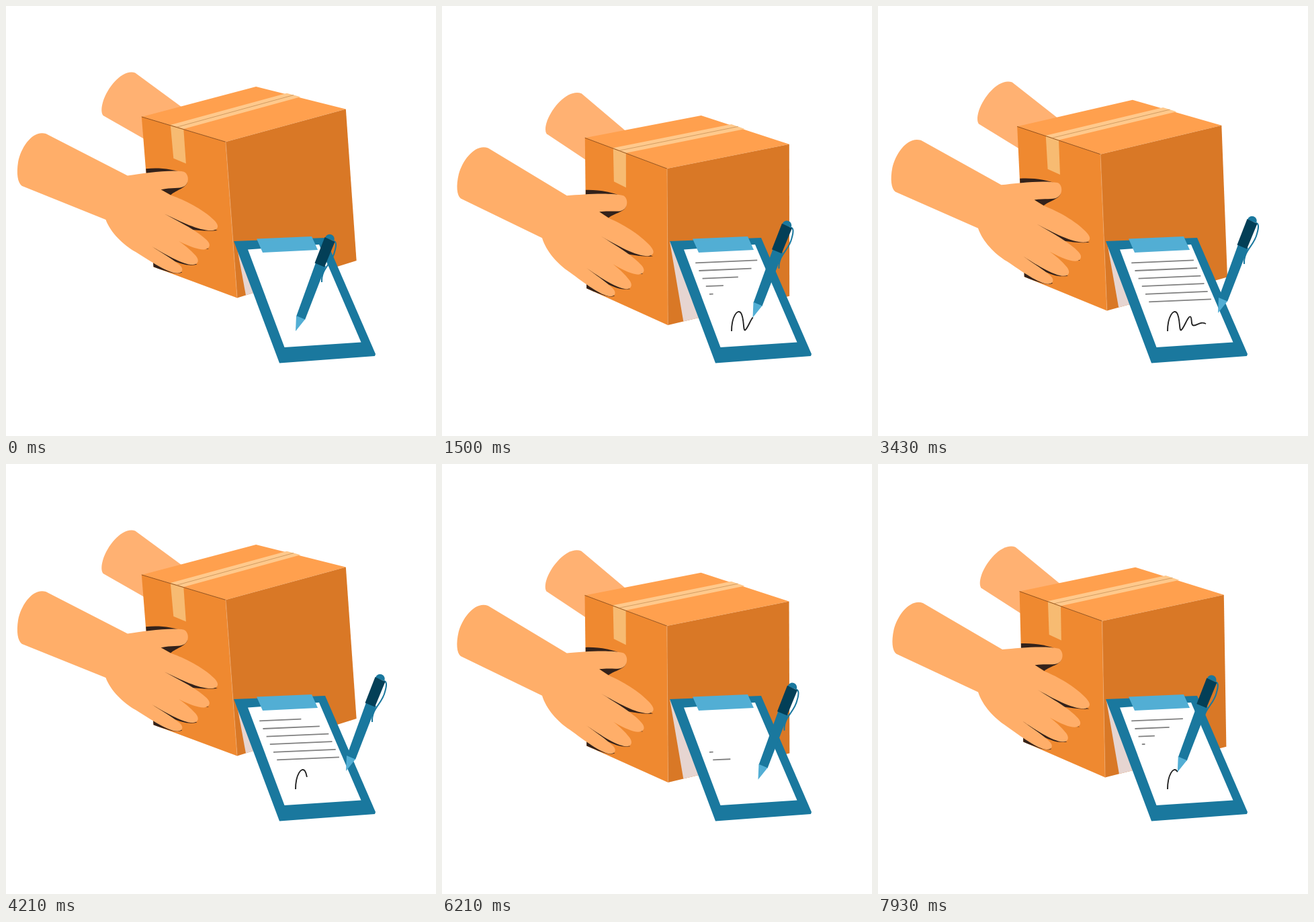
These frames come from a looping animation (640x640 px, 8 s). An HTML page with a canvas:

```html
<!DOCTYPE html>
<html lang="en">
<head>
<meta charset="utf-8">
<title>Parcel delivery</title>
<style>
  html, body { margin: 0; height: 100%; overflow: hidden; background: #fff; }
  canvas { display: block; width: 100vw; height: 100vh; }
</style>
</head>
<body>
<canvas width="640" height="640"></canvas>
<script>
const ctx = document.querySelector('canvas').getContext('2d');
const LOOP = 8000, FPS = 14;
const BLUE = '#1a789e', LIGHT_BLUE = '#52aed4', NAVY = '#033f57', DARK = '#33221b';

const shape = (d, color) => ({ path: new Path2D(d), color });
const rightFace = new Path2D('M335 243 517 207 517 433 336 476Z');

// Parcel and arms in their lowered pose
const parcel = [
  shape('M274 187 208 131C190 124 166 148 157 171C153 182 154 188 156 191L216 231Z', '#ffb172'),
  shape('M213 197 335 243 336 476 215 421Z', '#ef8930'),
  shape('M213 197 386 164 517 207 335 243Z', '#ffa04e'),
  { path: rightFace, color: '#d97826' },
  shape('M255 212 431 177 451 184 274 219.5Z', '#ffc98c'),
  shape('M255 212 274 219.5 274 271 256 262Z', '#f7bb72')
];
const seams = [
  ['M213 197 335 243', '#8a4a17', 0.9],
  ['M264 216 441 180.5', '#c08a50', 0.7],
  ['M335.3 243 336 476', '#f0b07a', 0.6]
].map(([d, color, width]) => ({ path: new Path2D(d), color, width }));
const hands = [
  shape('M214 274.5C235 274 254 278 270 285L214 290Z', DARK),
  shape('M234 307 274 298C273 307 257 309 248 316Z', DARK),
  shape('M236 343 285 362 314 373.5C300 374 288 372 276 370Z', DARK),
  shape('M220 362 270 383 299 400C286 400 276 394 268 390Z', DARK),
  shape('M214 390 250 406 280 422C266 424 256 419 247 415Z', DARK),
  shape('M215 413 257 432C250 435 242 433 215 421Z', DARK),
  shape(`M69 212C50 205 31 229 25 251C21 268 22 282 28 287L149 346
    C155 366 172 385 190 397C212 413 236 432 250 433C258 433 260 427 254 421
    C244 411 228 401 214 390C230 401 258 421 274 422C282 422 284 416 279 409
    C265 390 240 374 220 362C242 378 275 400 292 400.5C301 400 303 394 297 387
    C285 373 260 358 236 343C262 358 290 374 308 373C317 371 317 365 307 355
    C290 337 262 322 247 316L234 307C250 305 262 308 268 305
    C277 302 278 287 270 283C250 278 210 281 186 283Z`, '#ffae69')
];

const clipboard = [
  shape('M339 350 475 345 550 518 549 521 407 531.5Z', BLUE),
  shape('M360 362.5 466 355 528.5 500.5 414.5 508Z', '#fff'),
  shape('M373 346.5 455 343 464 363 382 367Z', LIGHT_BLUE)
];

// Pen relative to its tip
const pen = [
  shape('M1 -22 14 -17 45 -97 30 -102Z', BLUE),
  shape('M0 0 1 -23 14 -17.5Z', LIGHT_BLUE),
  shape('M44 -139A7 7 0 1 1 57 -134Z', BLUE),
  shape('M28.5 -101.5 43 -95.5 58.5 -133 43.5 -140Z', NAVY)
];
const penClip = new Path2D('M56 -134C61 -134 61 -128 58 -118C54 -100 38 -94 39 -73');

const signature = document.createElementNS('http://www.w3.org/2000/svg', 'path');
signature.setAttribute('d', `M431 484C431 462 440 450 445 457C450 465 448 483 451 482.5
  C455 481 461 461 465 462.5C468 464 465 476 470 475.5C476 475 480 469 488 473`);
const signaturePath = new Path2D(signature.getAttribute('d'));
const signatureLength = signature.getTotalLength();

const SIGN_START = { x: 431, y: 484 }, SIGN_END = { x: 488, y: 473 }, PEN_REST = { x: 506, y: 457 };

const clamp = p => Math.min(1, Math.max(0, p));
const ease = p => { p = clamp(p); return p * p * (3 - 2 * p); };
const mix = (a, b, p) => ({ x: a.x + (b.x - a.x) * p, y: a.y + (b.y - a.y) * p });

function fillAll(shapes) {
  for (const { path, color } of shapes) {
    ctx.fillStyle = color;
    ctx.fill(path);
  }
}

function stroke(path, color, width) {
  ctx.strokeStyle = color;
  ctx.lineWidth = width;
  ctx.stroke(path);
}

function drawParcel(t) {
  const phase = (t - 408 + 4766) % 4766;
  const raised = 1 - ease(phase / 1200) + ease((phase - 2383) / 1200);
  const tilt = () => {
    ctx.translate(-250, 340);
    ctx.rotate(-0.0701 * raised);
    ctx.translate(250, -340);
  };

  ctx.save();
  tilt();
  fillAll(parcel);
  seams.forEach(s => stroke(s.path, s.color, s.width));
  fillAll(hands);
  ctx.restore();

  // Reflection of the clipboard, visible only on the parcel side
  ctx.save();
  tilt();
  ctx.clip(rightFace);
  ctx.setTransform(1, 0, 0, 1, 0, 0);
  fillAll([shape(`M${339 + 3.4 * raised} 351 ${361 + 5 * raised} 480 420 480 400 351Z`, '#e6d5d1')]);
  ctx.restore();
}

function drawTextLines(t) {
  const phase = t % 6767;
  for (let i = 0; i < 6; i++) {
    const local = phase - 316 * i;
    const shown = ease(local / 1580) - ease((local - 3607) / 1580);
    if (shown < 0.005) continue;
    const x = 377.2 + 5.2 * i, y = 382.4 + 11.6 * i;
    stroke(new Path2D(`M${x} ${y}l${92.7 * shown} ${-4 * shown}`), '#808080', 1.8);
  }
}

function drawSignatureAndPen(t) {
  const phase = t % 7050;
  const written = ease(phase / 2360) * signatureLength;
  const shown = written - ease((phase - 3530) / 1170) * signatureLength;
  if (shown > 0.1) {
    ctx.setLineDash([shown, 999]);
    stroke(signaturePath, '#222', 1.9);
    ctx.setLineDash([]);
  }

  let tip;
  if (phase < 2360) tip = signature.getPointAtLength(written);
  else if (phase < 4700) tip = mix(SIGN_END, PEN_REST, ease((phase - 2360) / 440));
  else tip = mix(PEN_REST, SIGN_START, ((phase - 4700) / 2350) ** 1.7);

  ctx.save();
  ctx.translate(tip.x, tip.y);
  stroke(penClip, BLUE, 2);
  fillAll(pen);
  ctx.restore();
}

function draw(now) {
  // The motion advances in steps of 14 per second
  const t = Math.floor((now % LOOP + 6) * FPS / 1000) * 1000 / FPS % LOOP;
  ctx.fillStyle = '#fff';
  ctx.fillRect(0, 0, 640, 640);
  drawParcel(t);
  fillAll(clipboard);
  drawTextLines(t);
  drawSignatureAndPen(t);
}

const start = performance.now();
function tick() {
  draw(performance.now() - start);
  requestAnimationFrame(tick);
}
tick();
</script>
</body>
</html>
```
